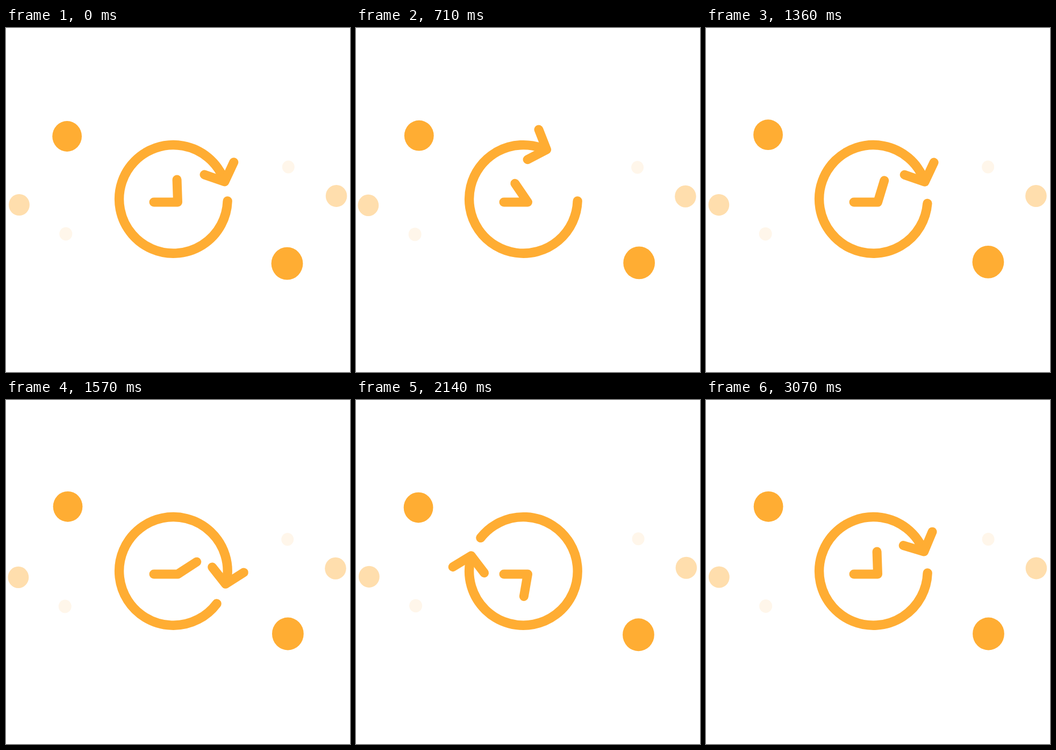
An HTML page for the animation above (3140 ms loop, 640 by 640 pixels).

```html
<!DOCTYPE html>
<html lang="en">
<head>
<meta charset="utf-8">
<title>Clock loop</title>
<style>
  html, body { margin: 0; width: 100%; height: 100%; overflow: hidden; background: #fff; }
  svg { display: block; width: 100%; height: 100%; }
  .line { fill: none; stroke: #ffad33; stroke-width: 17; stroke-linecap: round; stroke-linejoin: round; }
  #ring { stroke-width: 17.4; }
</style>
</head>
<body>
<svg viewBox="0 0 640 640">
  <g id="large" fill="#ffad33">
    <ellipse cx="113.6" cy="201.5" rx="27.4" ry="28.4"/>
    <ellipse cx="523" cy="438.2" rx="29.4" ry="30.4"/>
  </g>
  <g id="small">
    <g fill="#ffdead">
      <ellipse cx="24.5" cy="329" rx="19.4" ry="20.1"/>
      <ellipse cx="614.6" cy="312.4" rx="19.8" ry="20.5"/>
    </g>
    <g fill="#fff6ea">
      <ellipse cx="525.3" cy="258.4" rx="11.5" ry="12"/>
      <ellipse cx="111.3" cy="383" rx="12" ry="12.4"/>
    </g>
  </g>
  <path id="ring" class="line"/>
  <path id="arrow" class="line"/>
  <path id="hands" class="line"/>
</svg>
<script>
const LOOP = 3140, STEP = 1000 / 14, LAST_STEP = 43;
const RING = 100.8, ARM = 40, HAND = 42;
const $ = id => document.getElementById(id);

// Point at an angle in degrees, clockwise from the right.
function polar([x, y], r, deg) {
  const a = deg * Math.PI / 180;
  return [x + r * Math.cos(a), y + r * Math.sin(a)];
}

// Progress 0..1 between two steps, eased by cubic-bezier(x1, 0, x2, 1).
function ease(s, from, to, x1 = 1 / 3, x2 = 2 / 3) {
  const x = Math.min(Math.max((s - from) / (to - from), 0), 1);
  let low = 0, high = 1;
  for (let i = 0; i < 24; i++) {
    const u = (low + high) / 2, v = 1 - u;
    if (3 * u * v * v * x1 + 3 * u * u * v * x2 + u * u * u < x) low = u;
    else high = u;
  }
  return low * low * (3 - 2 * low);
}

const wave = (s, mean, size, period, peak) =>
  mean + size * Math.cos(2 * Math.PI * (s - peak) / period);

function drift(id, s, x, y) {
  const amount = ease(s, 0, 3);
  $(id).setAttribute('transform', `translate(${x * amount} ${y * amount})`);
}

function draw(time) {
  const s = Math.min(Math.floor((time % LOOP + 5) / STEP), LAST_STEP);

  drift('large', s, wave(s, 2.5, 1.2, 26, 10.5), wave(s, -2.2, 1, 21, 11.5));
  drift('small', s, wave(s, -0.9, 0.75, 13, 29.5), wave(s, 0, 0.9, 11.5, 10.3));

  // The arrow winds back, returns, then pushes the ring's tail through a full turn.
  const turn = 360 * ease(s, 18, 38.4, 0.33, 0.72);
  const tail = 2 + turn;
  const head = -18 - 48 * ease(s, 0, 9) + 45.7 * ease(s, 9, 18) + turn;

  const center = [311.4, 318.4];
  $('ring').setAttribute('d',
    `M${polar(center, RING, tail)}A${RING} ${RING} 0 1 1 ${polar(center, RING, head - 6)}`);

  const tip = polar([311.2, 317], 100.6, head);
  const back = head + 85 + 180;
  $('arrow').setAttribute('d',
    `M${polar(tip, ARM, back - 48)}L${tip}L${polar(tip, ARM, back + 48)}`);

  const pivot = [319.5, 324];
  const hand = -92 - 34.5 * ease(s, 0, 11.8) + 394.5 * ease(s, 11.8, 38.4, 0.33, 1);
  $('hands').setAttribute('d', `M275 324L${pivot}L${polar(pivot, HAND, hand)}`);
}

const start = performance.now();
function tick() {
  draw(performance.now() - start);
  requestAnimationFrame(tick);
}
tick();
</script>
</body>
</html>
```
